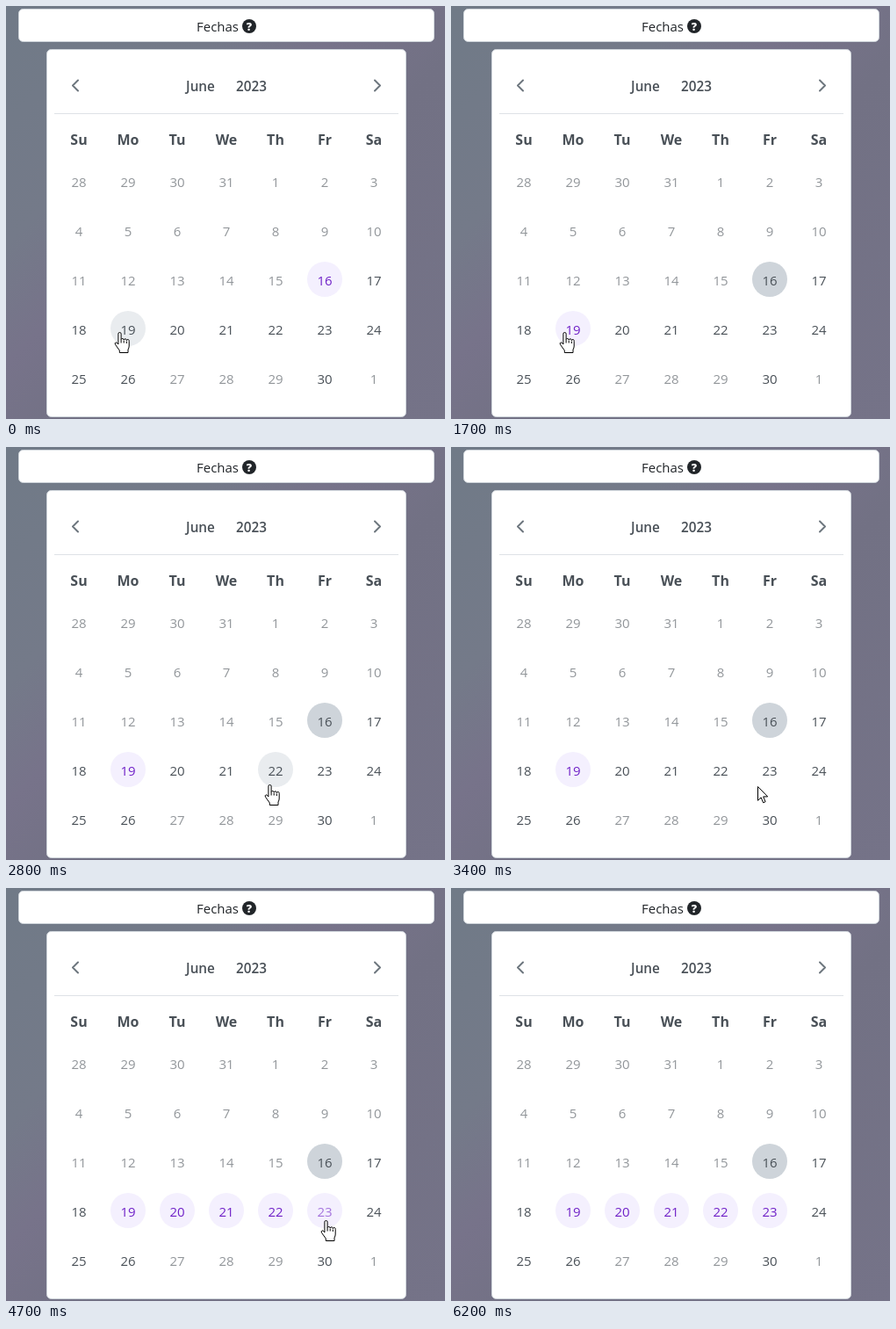
Write an HTML page that moves like this. It is 500x470 px and loops after 6700 ms.

```html
<!DOCTYPE html>
<html lang="es">
<head>
<meta charset="utf-8">
<title>Fechas</title>
<style>
  html, body { margin: 0; width: 100%; height: 100%; overflow: hidden; }
  svg { display: block; width: 500px; height: 470px; background: linear-gradient(135deg, #707a87, #747a89 28%, #77738a 42%, #727184 58%, #757388); }
  text { font: 15px "Open Sans", "Noto Sans", sans-serif; fill: #495057; text-anchor: middle; }
  .label { fill: #212529; }
  .month { font-size: 15.3px; font-weight: 600; }
  .week { font-size: 16px; font-weight: 700; }
  .off { opacity: .6; }
  .chevron { fill: none; stroke: #6c757d; stroke-width: 2; stroke-linecap: round; stroke-linejoin: round; }
  .card { fill: #fff; stroke: #ced4da; }
  .pointer { fill: #fff; stroke: #000; stroke-linejoin: round; }
</style>
</head>
<body>
<svg viewBox="0 0 500 470">
  <rect class="card" x="14.5" y="3.5" width="473" height="37" rx="5"/>
  <text class="label" x="241" y="29">Fechas</text>
  <circle cx="277" cy="23" r="8" fill="#212529"/>
  <text x="277" y="27.5" style="font-size:12.5px;font-weight:800;fill:#fff">?</text>

  <rect class="card" x="46.5" y="49.5" width="409" height="418" rx="5"/>
  <path class="chevron" d="M82 84.5L76 90.5L82 96.5M420 84.5L426 90.5L420 96.5"/>
  <text class="month" x="221.5" y="97">June</text>
  <text class="month" x="279.5" y="97">2023</text>
  <path d="M55 122.5H447" stroke="#dee2e6"/>
  <g id="grid"></g>

  <g id="hand" class="pointer">
    <path d="M-1.6 13.5V1.6a1.6 1.6 0 0 1 3.2 0V8a1.6 1.5 0 0 1 3.1 .4a1.6 1.5 0 0 1 3.1 .7a1.5 1.5 0 0 1 2.9 1V15.5q0 2-1.2 4V23H-.2V20.5L-5 13.8q-1-1.8 .5-2.4q1-.3 1.8 .7Z"/>
    <path d="M1.6 8V12M4.7 9V12M7.8 10V12.5" fill="none"/>
  </g>
  <path id="arrow" class="pointer" d="M0 0V15.8L3.7 12.4L6.1 18.3L8.6 17.2L6.2 11.4H11.2Z"/>
</svg>
<script>
  const LOOP = 6700, STEP = 100, START_PICK = 1700, END_PICK = 4700;
  const TODAY = 16;
  const grid = document.getElementById('grid');
  const hand = document.getElementById('hand');
  const arrow = document.getElementById('arrow');

  // Pointer hotspot: time, x, y
  const path = [
    [0, 129, 371], [1800, 129, 371], [2000, 152, 379], [2300, 199, 386],
    [2400, 206, 386], [2800, 300, 384], [3000, 309, 384], [3400, 349, 386],
    [3700, 360, 382], [4000, 364, 378], [5700, 364, 378], [5900, 390, 408],
    [6200, 402, 472]
  ];

  function add(tag, attrs, content = '') {
    const el = document.createElementNS('http://www.w3.org/2000/svg', tag);
    for (const key in attrs) el.setAttribute(key, attrs[key]);
    el.textContent = content;
    return grid.appendChild(el);
  }

  ['Su', 'Mo', 'Tu', 'We', 'Th', 'Fr', 'Sa'].forEach((name, i) =>
    add('text', { class: 'week', x: 83 + i * 56, y: 158 }, name));

  const cells = Array.from({ length: 35 }, (_, i) => {
    const x = 83 + i % 7 * 56, y = 199 + Math.floor(i / 7) * 56;
    const inMonth = i > 3 && i < 34;
    const day = i < 4 ? 28 + i : inMonth ? i - 3 : 1;
    const enabled = inMonth && day >= TODAY && (day < 27 || day > 29);
    const disc = add('circle', { cx: x, cy: y, r: 20 });
    const text = add('text', { x, y: y + 7, class: enabled ? '' : 'off' }, day);
    return { x, y, day, enabled, disc, text };
  });

  function pointerAt(t) {
    const i = path.findIndex(p => p[0] > t);
    if (i < 0) return [0, 600];
    const [t0, x0, y0] = path[i - 1], [t1, x1, y1] = path[i];
    const k = (t - t0) / (t1 - t0);
    return [x0 + (x1 - x0) * k, y0 + (y1 - y0) * k];
  }

  function isPicked(day, t) {
    if (t < START_PICK) return day === TODAY;
    return day >= 19 && day <= (t < END_PICK ? 19 : 23);
  }

  function draw(t) {
    const [px, py] = pointerAt(t);
    let over = false;
    for (const c of cells) {
      if (!c.enabled) {
        c.disc.style.fill = 'none';
        continue;
      }
      const hover = Math.hypot(px - c.x, py - c.y) < 20;
      const picked = isPicked(c.day, t);
      over = over || hover;
      c.disc.style.fill = picked ? '#f4f0fe' : c.day === TODAY ? '#ced4da' : hover ? '#e9ecef' : 'none';
      c.text.style.fill = picked ? '#7022c8' : '';
      const fading = c.day === 23 && picked;
      c.text.style.opacity = fading ? Math.min(1, .6 + (t - END_PICK) / 1000) : 1;
    }
    const spot = `translate(${Math.round(px) + .5} ${Math.round(py) + .5})`;
    hand.setAttribute('transform', spot);
    arrow.setAttribute('transform', spot);
    hand.style.display = over ? '' : 'none';
    arrow.style.display = over ? 'none' : '';
  }

  const begin = performance.now();
  function tick() {
    const t = Math.max(0, performance.now() - begin) % LOOP;
    draw(Math.floor(t / STEP) * STEP);
    requestAnimationFrame(tick);
  }
  tick();
</script>
</body>
</html>
```
